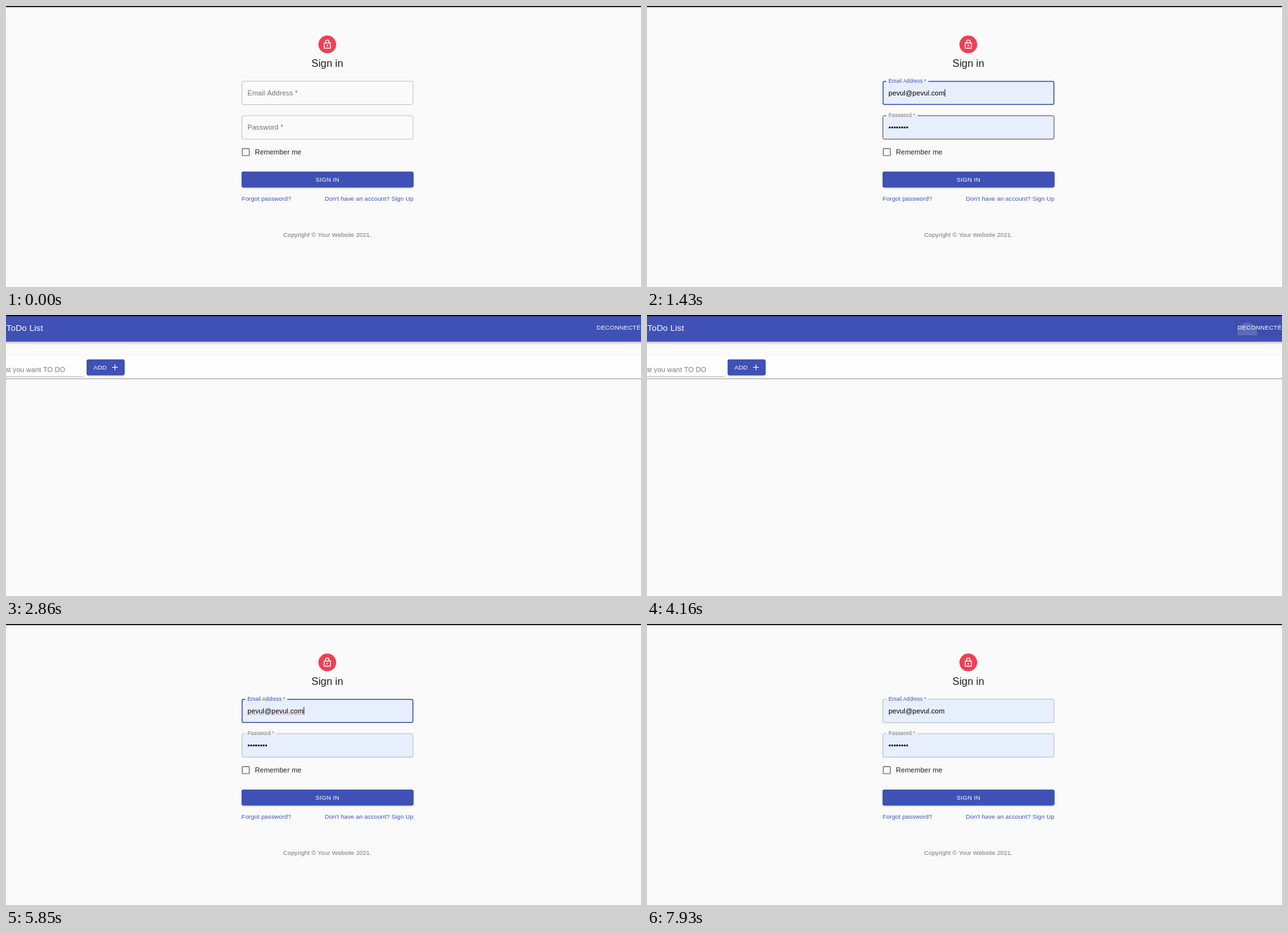
An HTML page with a canvas that plays this animation: 1000 px wide and 443 px high, repeating every 8060 ms.

```html
<!DOCTYPE html>
<html lang="en">
<head>
<meta charset="utf-8">
<title>Sign in</title>
<style>
html, body { margin: 0; width: 100%; height: 100%; overflow: hidden; background: #fafafa; }
canvas { display: block; width: 100%; height: 100%; }
</style>
</head>
<body>
<canvas id="stage" width="1000" height="443"></canvas>
<script>
const ctx = document.getElementById('stage').getContext('2d');
const LOOP = 8060, STEP = 130;
const K = 0.683; // page zoom
const BLUE = [63, 81, 181], BLUE_DARK = [48, 63, 159], GREY = [117, 117, 117];
const INK = 'rgba(0,0,0,.87)', MUTED = 'rgba(0,0,0,.54)';
const EMAIL = 'pevul@pevul.com';

const rgb = c => `rgb(${c.map(Math.round).join()})`;
const mix = (a, b, p) => rgb(a.map((v, i) => v + (b[i] - v) * p));
const ramp = (t, start, len) => Math.min(1, Math.max(0, (t - start) / len));
const easeOut = p => 1 - (1 - p) ** 3;
const within = (t, ...spans) => spans.some(([a, b]) => t >= a && t < b);

function text(str, x, y, px, color, { align = 'left', space = 0.00938, scale = 1 } = {}) {
  const size = px * K * scale;
  ctx.font = `${size}px "Liberation Sans", Arial, sans-serif`;
  ctx.letterSpacing = `${size * space}px`;
  ctx.textAlign = align;
  ctx.fillStyle = color;
  ctx.fillText(str, x, y);
  return ctx.measureText(str).width;
}

function box(x, y, w, h, r, fill) {
  ctx.beginPath();
  ctx.roundRect(x, y, w, h, r);
  ctx.fillStyle = fill;
  ctx.fill();
}

function shadow(x, y, w, h, dy, blur, spread, alpha) {
  if (alpha <= 0) return;
  const s = spread * K;
  ctx.save();
  ctx.shadowColor = `rgba(0,0,0,${alpha})`;
  ctx.shadowBlur = blur * K;
  ctx.shadowOffsetY = dy * K;
  box(x - s, y - s, w + 2 * s, h + 2 * s, 2.7, '#3f51b5');
  ctx.restore();
}

function button(x, y, w, h, hover) {
  const rest = 1 - hover;
  shadow(x, y, w, h, 3, 1, -2, 0.2 * rest);
  shadow(x, y, w, h, 2, 2, 0, 0.14 * rest);
  shadow(x, y, w, h, 1, 5, 0, 0.12 * rest);
  shadow(x, y, w, h, 2, 4, -1, 0.2 * hover);
  shadow(x, y, w, h, 4, 5, 0, 0.14 * hover);
  shadow(x, y, w, h, 1, 10, 0, 0.12 * hover);
  box(x, y, w, h, 2.7, mix(BLUE, BLUE_DARK, hover));
}

function base() {
  ctx.fillStyle = '#fafafa';
  ctx.fillRect(0, 0, 1000, 443);
}

function topEdge() {
  ctx.fillStyle = '#000';
  ctx.fillRect(0, 0, 1000, 1.7);
}

function lockBadge() {
  ctx.beginPath();
  ctx.arc(506, 60.6, 14, 0, Math.PI * 2);
  ctx.fillStyle = '#ee4055';
  ctx.fill();
  ctx.save();
  ctx.translate(506 - 12 * K, 60.4 - 12 * K);
  ctx.scale(K, K);
  ctx.strokeStyle = ctx.fillStyle = '#fff';
  ctx.lineWidth = 2;
  ctx.strokeRect(5, 9, 14, 12);
  ctx.beginPath();
  ctx.moveTo(8, 9);
  ctx.lineTo(8, 6);
  ctx.arc(12, 6, 4, Math.PI, 0);
  ctx.lineTo(16, 9);
  ctx.stroke();
  ctx.beginPath();
  ctx.arc(12, 15, 2, 0, Math.PI * 2);
  ctx.fill();
  ctx.restore();
}

function field(y, label, notch, s) {
  const x = 371, w = 270.5, h = 38;
  if (s.value) box(x, y, w, h, 2.7, '#e7effd');

  const line = s.focus ? 1.5 : 1;
  ctx.save();
  if (s.shrink > 0) {
    // leave a gap in the top edge for the raised label
    ctx.beginPath();
    ctx.rect(0, 0, 1000, 443);
    ctx.rect(377, y - 2, notch * s.shrink, 5);
    ctx.clip('evenodd');
  }
  ctx.beginPath();
  ctx.roundRect(x + line / 2, y + line / 2, w - line, h - line, 2.4);
  ctx.lineWidth = line;
  ctx.strokeStyle = s.focus ? rgb(BLUE) : s.hover ? '#4a4a4f' : 'rgba(0,0,0,.22)';
  ctx.stroke();
  ctx.restore();

  if (s.value) {
    const width = text(s.value, 380.3, y + 22.6, 16, '#000');
    if (s.spell) squiggle(380, y + 24.7, width);
    if (s.caret) ctx.fillRect(380.3 + width, y + 13, 0.9, 12);
  } else if (s.caret) {
    ctx.fillStyle = '#000';
    ctx.fillRect(380.3, y + 13, 0.9, 12);
  }
  text(label, 380.3, y + 22.6 - 19.7 * s.shrink, 16, mix(GREY, BLUE, s.tint),
    { scale: 1 - 0.25 * s.shrink });
}

function squiggle(x, y, width) {
  ctx.save();
  ctx.strokeStyle = 'rgba(200,70,70,.75)';
  ctx.lineWidth = 0.9;
  ctx.setLineDash([1.4, 0.8]);
  ctx.beginPath();
  ctx.moveTo(x, y);
  ctx.lineTo(x + width * 0.3, y);
  ctx.moveTo(x + width * 0.43, y);
  ctx.lineTo(x + width, y);
  ctx.stroke();
  ctx.restore();
}

function signIn(t) {
  const second = t >= 4420;
  const filled = within(t, [650, 2860], [4550, LOOP]);
  const focus = within(t, [260, 2690], [4420, 7870]);
  const blur = second ? ramp(t, 7870, 200) : ramp(t, 2650, 200);
  const hover = second
    ? ramp(t, 6450, 250) - ramp(t, 7100, 250)
    : ramp(t, 2280, 220);

  base();
  lockBadge();
  text('Sign in', 506, 96.2, 24, INK, { align: 'center', space: 0 });

  field(118, 'Email Address *', 66, {
    value: filled && EMAIL,
    focus,
    caret: within(t, [260, 780], [1430, 2080], [4420, 5330], [5850, 6500], [7150, 7800]),
    spell: within(t, [5850, 7800]),
    shrink: second ? 1 : easeOut(ramp(t, 200, 200)),
    tint: t < 260 ? 0 : 1 - blur
  });
  field(172.4, 'Password *', 49, {
    value: filled && '•'.repeat(8),
    hover: within(t, [1170, 1560]),
    shrink: easeOut(ramp(t, second ? 4550 : 650, 200)),
    tint: 0
  });

  ctx.strokeStyle = MUTED;
  ctx.lineWidth = 1.4;
  ctx.beginPath();
  ctx.roundRect(372.1, 224.8, 11.1, 11.1, 0.8);
  ctx.stroke();
  text('Remember me', 392, 234, 16, INK);

  button(371, 261.2, 270.5, 24.6, hover);
  text('SIGN IN', 506.2, 277, 14, '#fff', { align: 'center', space: 0.02857 });
  text('Forgot password?', 371, 307, 14, rgb(BLUE), { space: 0.01071 });
  text("Don't have an account? Sign Up", 641.6, 307, 14, rgb(BLUE), { align: 'right', space: 0.01071 });
  text('Copyright © Your Website 2021.', 506, 364, 14, MUTED, { align: 'center', space: 0.01071 });
  topEdge();
}

function ripple(t) {
  ctx.save();
  ctx.beginPath();
  ctx.rect(930, 8, 70, 24);
  ctx.clip();
  ctx.beginPath();
  ctx.arc(945, 28, 16 + (t - 4160) * 0.2, 0, Math.PI * 2);
  ctx.fillStyle = 'rgba(255,255,255,.16)';
  ctx.fill();
  ctx.restore();
}

function todo(t) {
  base();
  ctx.fillStyle = '#fefefe';
  ctx.fillRect(0, 66, 1000, 34);
  ctx.fillStyle = '#98989c';
  ctx.fillRect(0, 100, 1000, 1);

  text('What you want TO DO', 93.3, 90.3, 16, GREY_TEXT, { align: 'right' });
  ctx.fillStyle = 'rgba(0,0,0,.36)';
  ctx.fillRect(0, 96.8, 122.5, 0.9);

  button(127, 70.2, 59.5, 24.6, 0);
  text('ADD', 137.8, 86.2, 14, '#fff', { space: 0.02857 });
  ctx.fillStyle = '#fff';
  ctx.fillRect(167, 82, 9, 1.1);
  ctx.fillRect(171, 78, 1.1, 9);

  shadow(-10, 0, 1020, 41.4, 2, 4, -1, 0.2);
  shadow(-10, 0, 1020, 41.4, 4, 5, 0, 0.14);
  shadow(-10, 0, 1020, 41.4, 1, 10, 0, 0.12);
  ctx.fillStyle = rgb(BLUE);
  ctx.fillRect(0, 0, 1000, 41.4);
  text('ToDo List', 0.5, 24.6, 20, '#fff', { space: 0.0075 });
  const hover = ramp(t, 3700, 250);
  if (hover) box(925, 8, 82, 24.3, 2.7, `rgba(0,0,0,${0.04 * hover})`);
  if (t >= 4160) ripple(t);
  text('DECONNECTÉ', 930, 23.4, 14, '#fff', { space: 0.02857 });
  topEdge();
}

const GREY_TEXT = '#7d7d7d';

function draw(now) {
  const t = Math.floor((now % LOOP) / STEP) * STEP;
  (within(t, [2860, 4420]) ? todo : signIn)(t);
}

const start = performance.now();
function tick() {
  draw(performance.now() - start);
  requestAnimationFrame(tick);
}
tick();
</script>
</body>
</html>
```
